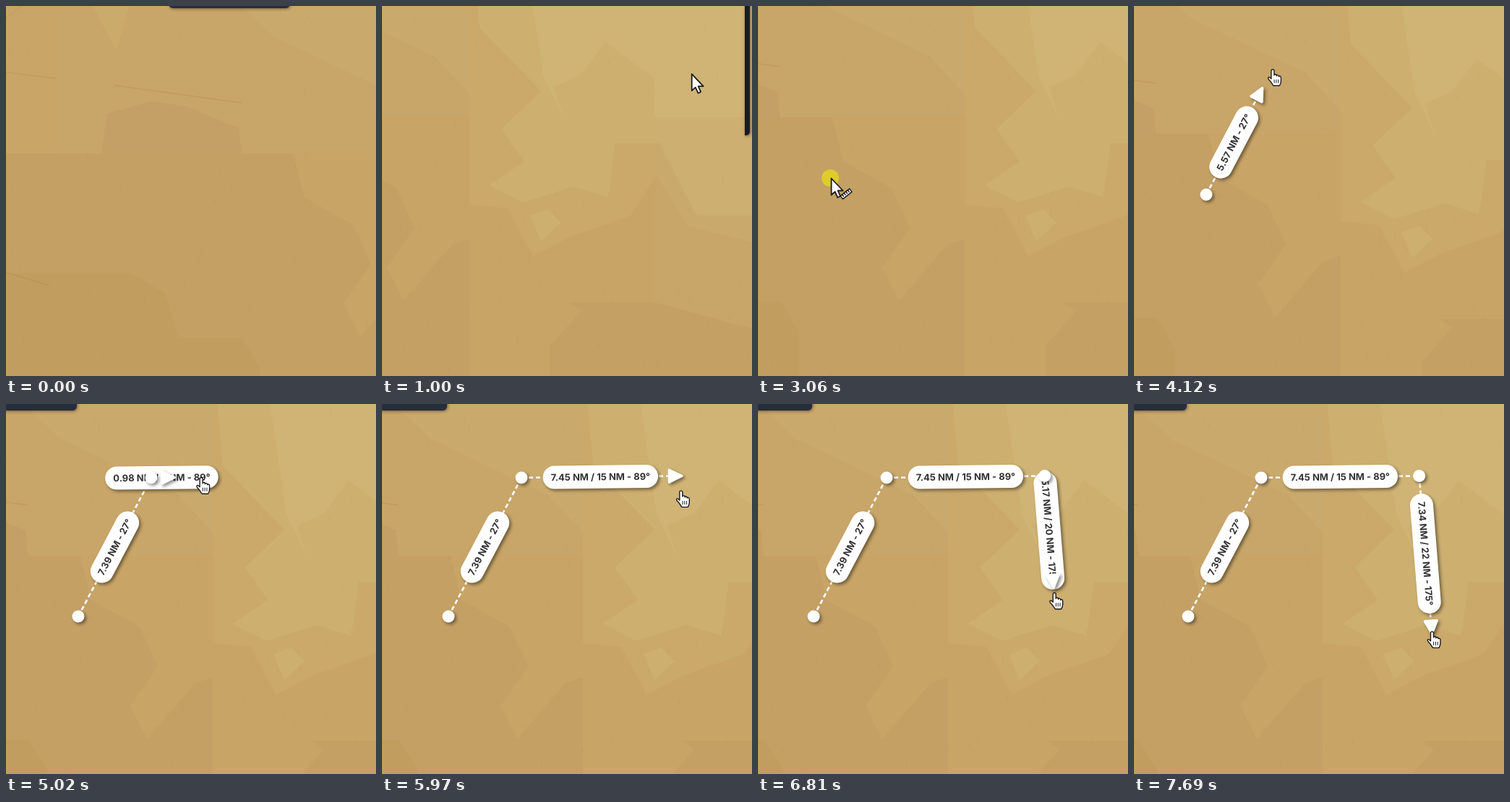
An HTML page with a canvas for the animation above (8000 ms loop, 512 by 512 pixels).

```html
<!DOCTYPE html>
<html lang="en">
<head>
<meta charset="utf-8">
<title>Measuring a route</title>
<style>
  html, body { margin: 0; width: 100%; height: 100%; overflow: hidden; background: #c9a668; }
  canvas { display: block; width: 512px; height: 512px; }
</style>
</head>
<body>
<canvas id="stage" width="512" height="512"></canvas>
<script>
const LOOP = 8000, SCALE = 29.36, LAG = 125, CLICK = 100;
const PICK = 1540, DRAW = 3360;
const g = document.getElementById('stage').getContext('2d');

// Vertices of the route, and when the pointer leaves each of them
const VERTEX = [[100, 238], [201, 46], [419.7, 43.6]];
const LEAVE = [DRAW, 4700, 5850];
const CLICKS = [PICK, 3060, 4670, 5850, 7590];

// Moves: begin, finish, x, y
const POINTER = [
  [310, 1100, 602, 80], [1645, 2710, ...VERTEX[0]],
  [LEAVE[0], 4300, ...VERTEX[1]], [LEAVE[1], 5560, ...VERTEX[2]],
  [LEAVE[2], 6380, 431.9, 194.6], [6670, 7230, 437, 258.4]
];
const CAMERA = [
  [60, 100, 26, 0], [310, 1100, -174, 0], [2330, 2710, 0, 0], [3900, 4400, 0, 56],
  [5480, 5680, -8, 56], [5960, 6600, -23, 56], [6830, 7300, -25, 56]
];

const ease = (t, a, b) => {
  const p = Math.min(1, Math.max(0, (t - a) / (b - a)));
  return p * p * (3 - 2 * p);
};

function follow([x, y], moves, t) {
  for (const [a, b, toX, toY] of moves) {
    const p = ease(t, a, b);
    x += (toX - x) * p;
    y += (toY - y) * p;
  }
  return [x, y];
}
const pointer = t => follow([375, 395], POINTER, t);
const camera = t => follow([295, 50], CAMERA, t);

function box(c, x, y, w, h, r, fill) {
  c.fillStyle = fill;
  c.beginPath();
  c.roundRect(x, y, w, h, r);
  c.fill();
}
const disc = (x, y, r, fill) => box(g, x - r, y - r, 2 * r, 2 * r, r, fill);

function shadow(offset) {
  g.shadowColor = offset ? 'rgba(0,0,0,.45)' : 'transparent';
  g.shadowOffsetX = g.shadowOffsetY = offset;
  g.shadowBlur = offset ? 4 : 0;
}

// The map is painted once; its corner lies at world (-300, -60)
const map = document.createElement('canvas');
map.width = 990;
map.height = 640;

function paintMap(c) {
  let seed = 7;
  const rnd = () => (seed = seed * 16807 % 2147483647) / 2147483647;
  const area = (fill, path) => { c.fillStyle = fill; c.fill(new Path2D('M' + path + 'Z')); };
  c.translate(300, 60);
  c.fillStyle = '#c9a668';
  c.fillRect(-300, -60, 990, 640);
  area('#c5a166', '-163 154L-155 99-95 82-45 89 27 119 31 154H103L118 215 185 252 210 307 172 362 195 408 262 330 286 322V580H-300V154');
  area('#c29e60', '-300 319L-123 319-75 347-57 409H31L57 450V580H-300');
  area('#cbaa6c', '20-60L75-8 238 70 286 122V275L339 280 374 346 424 320 509 290 545 235 589 305 690 330V-60');
  area('#ceb071', '292-60L300 30 385 118 330 170 362 215 313 248 360 272 430 250 478 265 488 190 549 190 600 290H690V-60');
  area('#d1b577', '365-60L388 97 416 155 403 112 440 95 474 50 542 100V154H690V-60');
  area('#ceb071', '370 290L395 281 413 300 385 326');
  area('#c5a165', '424 410L440 422 398 470V580H690V450L542 410');
  area('#ccac6c', '-180-60H-122L-142 12');

  // Neighbouring tiles differ by a trace of shade
  for (let x = -482; x < 690; x += 256)
    for (let y = -102; y < 580; y += 256) {
      c.fillStyle = `rgba(110,70,20,${rnd() * .012})`;
      c.fillRect(x, y, 256, 256);
    }
  c.strokeStyle = 'rgba(120,75,25,.15)';
  c.stroke(new Path2D('M-300 41L-226 50M-145 60L31 84M-300-29L-270-53M-300 317L-235 337'));
  c.strokeStyle = 'rgba(120,75,25,.05)';
  for (let i = 0; i < 190; i++) {
    const x = rnd() * 990 - 300, y = rnd() * 640 - 60;
    c.beginPath();
    c.moveTo(x, y);
    c.lineTo(x + rnd() * 5 - 2, y + 3 + rnd() * 7);
    c.stroke();
  }
}
paintMap(map.getContext('2d'));

function drawIcons() {
  g.strokeStyle = g.fillStyle = '#e9ebf2';
  g.lineWidth = 1.8;
  g.stroke(new Path2D('M597 11H611'));
  // Group
  g.strokeRect(597, 48, 14, 14);
  for (const x of [597, 611]) for (const y of [48, 62]) g.fillRect(x - 2.5, y - 2.5, 5, 5);
  g.fillRect(599.5, 51, 6, 5);
  g.fillRect(604, 55, 5, 5);
  // Tape
  disc(602, 103, 8, '#e9ebf2');
  g.fillRect(602, 109, 12, 2);
  disc(602, 103, 4, '#5a7cf2');
  disc(602, 103, 2, '#e9ebf2');
  // Eraser
  g.fill(new Path2D('M595 151L603 143Q604 142 605 143L612 150Q613 151 612 152L606 158H612V160H600L595 155Q593 153 595 151Z'));
  g.fillStyle = '#272c3d';
  g.fill(new Path2D('M600 150L597 153 602 158H604L606 156Z'));
}

function drawPanels(t) {
  shadow(1);
  box(g, -70, -120, 168, 73, 6, '#282d3e');
  box(g, 667, -60, 7, 239, [0, 0, 5, 0], '#191c28');
  shadow(0);
  const p = ease(t, 1130, 1350);
  g.save();
  g.globalAlpha = p;
  g.translate(16 * (1 - p), 0);
  box(g, 576, -60, 56, 239, 5, '#191c28');
  for (let i = 0; i < 4; i++)
    box(g, 584, 48 * i - 13, 40, 40, 4, i === 2 && t >= PICK ? '#5a7cf2' : '#272c3d');
  drawIcons();
  g.restore();
}

const HEAD = new Path2D('M-13-9.8L4-1.5Q6 0 4 1.5L-13 9.8Q-16 11-16 8V-8Q-16-11-13-9.8Z');

function drawLeg(a, b, turn, text) {
  g.strokeStyle = '#fff';
  g.lineWidth = 2.6;
  g.setLineDash([6, 4]);
  g.beginPath();
  g.moveTo(...a);
  g.lineTo(...b);
  g.stroke();
  g.setLineDash([]);

  g.save();
  g.translate((a[0] + b[0]) / 2, (a[1] + b[1]) / 2);
  g.rotate(turn);
  g.font = 'bold 13px Inter, sans-serif';
  g.textAlign = 'center';
  const w = g.measureText(text).width + 22;
  shadow(2.5);
  box(g, -w / 2, -16, w, 32, 16, '#fff');
  shadow(0);
  g.fillStyle = '#333';
  g.fillText(text, 0, 4.7);
  g.restore();
}

function drawRoute(t) {
  const count = LEAVE.filter(s => t > s + LAG).length;
  if (!count) return;
  let total = 0, end, turn;
  for (let i = 0; i < count; i++) {
    const a = VERTEX[i];
    end = i < count - 1 ? VERTEX[i + 1] : pointer(t - LAG);
    const dx = end[0] - a[0], dy = end[1] - a[1], miles = Math.hypot(dx, dy) / SCALE;
    turn = Math.atan2(dy, dx);
    total += miles;
    const sum = i ? ` / ${Math.round(total)} NM` : '';
    const bearing = Math.floor(turn * 180 / Math.PI + 90);
    drawLeg(a, end, turn, `${miles.toFixed(2)} NM${sum} - ${bearing}°`);
  }
  shadow(2.5);
  for (const [x, y] of VERTEX.slice(0, count)) disc(x, y, 8.5, '#fff');
  g.save();
  g.translate(...end);
  g.rotate(turn);
  g.fill(HEAD);
  g.restore();
  shadow(0);
}

const ARROW = new Path2D('M0 0V23L5 18.5 8.8 26.5 12.5 24.7 9 17H16Z');
const HAND = new Path2D('M-2 13V2Q-2 0 0 0T2 2V8Q2 6.8 3.7 6.8T5.4 9Q5.4 7.6 7 7.9T8.5 10Q8.7 9 10 9.3T11.5 11.5V16Q11.5 19 9.5 22.5H1Q-1.5 18-6 13.2Q-7 10.5-4.5 10.8Z');
const CREASES = new Path2D('M2.2 14V19M5 14V19M7.8 14V19');

function drawPointer(t) {
  const [x, y] = pointer(t);
  if (CLICKS.some(c => t >= c && t < c + CLICK)) disc(x, y, 12, 'rgba(225,212,36,.85)');
  if (t < 100) return;
  const hand = t >= DRAW, shape = hand ? HAND : ARROW;
  g.save();
  g.translate(x + (hand ? .5 : 1.5), y + .5);
  g.lineJoin = 'round';
  g.strokeStyle = '#1c1c1c';
  g.fillStyle = '#fff';
  g.lineWidth = hand ? 1.4 : 1.8;
  g.fill(shape);
  g.stroke(shape);
  if (hand) {
    g.lineWidth = 1;
    g.stroke(CREASES);
  } else if (t >= PICK) {
    // Ruler badge
    g.translate(20.5, 21.5);
    g.rotate(-.67);
    g.lineWidth = 1.5;
    g.fillRect(-8, -2.7, 16, 5.4);
    g.strokeRect(-8, -2.7, 16, 5.4);
    for (let i = -1.5; i < 2; i++) g.strokeRect(i * 3.3, -2.7, 0, 3);
  }
  g.restore();
}

function frame() {
  const t = performance.now() % LOOP;
  g.setTransform(1, 0, 0, 1, ...camera(t).map(Math.round));
  g.drawImage(map, -300, -60);
  drawPanels(t);
  drawRoute(t);
  drawPointer(t);
  requestAnimationFrame(frame);
}
frame();
</script>
</body>
</html>
```
